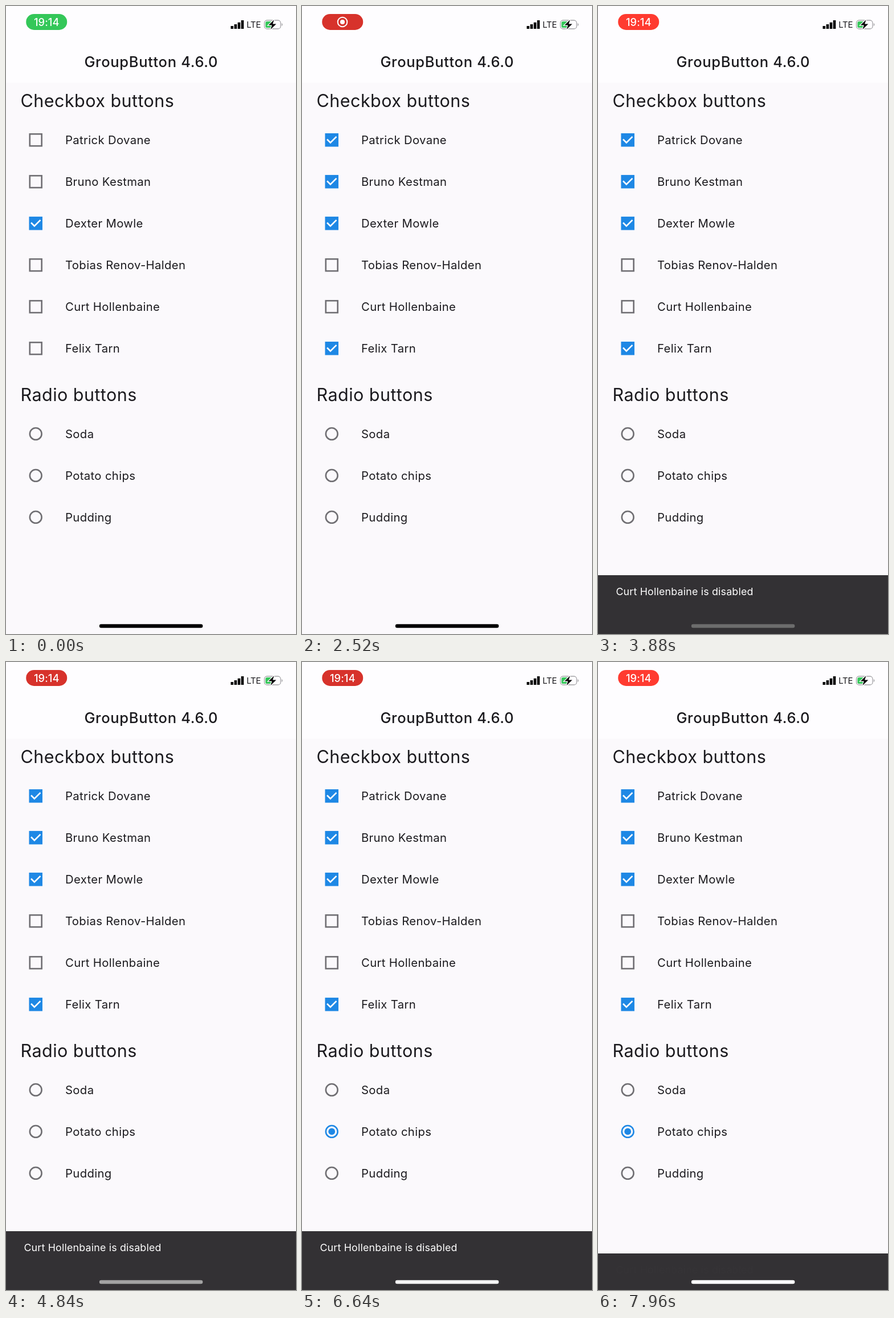
Recreate the animation shown at these times as an HTML page. Size 509 px wide and 1100 px high, loop 8000 ms.

```html
<!DOCTYPE html>
<html lang="en">
<head>
<meta charset="utf-8">
<title>GroupButton</title>
<style>
  html, body { margin: 0; width: 100%; height: 100%; overflow: hidden; background: #fbf9fc; }
  svg { display: block; width: 509px; height: 1100px; }
  text { font-family: Inter, "Open Sans", sans-serif; fill: #1b1a1e; }
  .title { font-size: 25.5px; font-weight: 500; letter-spacing: .68px; text-anchor: middle; }
  .head { font-size: 30.5px; letter-spacing: .45px; }
  .label { font-size: 20.3px; letter-spacing: .35px; }
  .snack { font-size: 17.8px; letter-spacing: .2px; fill: #fff; }
  .clock { font-size: 18.3px; font-weight: 500; letter-spacing: .1px; text-anchor: middle; fill: #fff; }
  .net { font-size: 15px; letter-spacing: -.3px; }
</style>
</head>
<body>
<svg id="stage" viewBox="0 0 509 1100">
  <rect width="509" height="1100" fill="#fbf9fc"/>
  <rect width="509" height="134.3" fill="#fefdff"/>

  <rect id="pill" x="35.2" y="13.9" width="72" height="28" rx="14"/>
  <text id="clock" class="clock" x="71.3" y="34.5">19:14</text>
  <g id="rec" fill="none" stroke="#fff" stroke-width="2">
    <circle cx="71" cy="28" r="8.3"/>
    <circle cx="71" cy="28" r="4" fill="#fff" stroke="none"/>
  </g>

  <path d="M394.5 35h4.6v5h-4.6zM400.6 32h4.6v8h-4.6zM406.7 28.8h4.6v11.2h-4.6zM412.7 25h4.6v15h-4.6z" fill="#000"/>
  <text class="net" x="422.3" y="38.4">LTE</text>
  <rect x="453.5" y="25" width="28.5" height="15" rx="4.6" fill="none" stroke="#a4a3a7" stroke-width="1.3"/>
  <path d="M483.8 30v5.2q1.7-.8 1.7-2.6t-1.7-2.6z" fill="#a4a3a7"/>
  <rect x="455.4" y="27" width="12.6" height="11" rx="2.6" fill="#34c759"/>
  <path d="M470.5 24.2l-9.7 9.3h6l-2.4 7.6 9.9-9.6h-6.2z" fill="#000" stroke="#fefdff" stroke-width="2.4" paint-order="stroke"/>

  <text class="title" x="254.8" y="107">GroupButton 4.6.0</text>
  <text class="head" x="25.6" y="177.3">Checkbox buttons</text>
  <text class="head" x="25.6" y="692.3">Radio buttons</text>
  <g id="rows"></g>

  <g id="snack">
    <rect width="509" height="110" fill="#333134"/>
    <text id="note" class="snack" x="31.4" y="35.3">Curt Hollenbaine is disabled</text>
  </g>
  <rect id="home" x="163.8" y="1082.8" width="181.6" height="6.5" rx="3.25"/>
</svg>
<script>
const LOOP = 8000, SWITCH = 200;
const BLUE = [30, 136, 229], GREY = [112, 111, 115], GREEN = [52, 199, 89];
const BOX = 23.5, LINE = 2.6, ROW = 73, CX = 52.2;

// on / off times in ms; -Infinity means on from the start
const checks = [
  { name: 'Patrick Dovane', on: 800 },
  { name: 'Bruno Kestman', on: 1535 },
  { name: 'Dexter Mowle', on: -Infinity },
  { name: 'Tobias Renov-Halden' },
  { name: 'Curt Hollenbaine' },
  { name: 'Felix Tarn', on: 2260 }
];
const radios = [
  { name: 'Soda', on: 4950, off: 6300 },
  { name: 'Potato chips', on: 6300 },
  { name: 'Pudding' }
];

const $ = id => document.getElementById(id);
const clamp = v => Math.max(0, Math.min(1, v));
const ramp = (t, from, len) => clamp((t - from) / len);
const rgb = c => `rgb(${c.map(Math.round)})`;
const mix = (a, b, k) => a.map((v, i) => v + (b[i] - v) * k);

function set(el, attrs) {
  for (const k in attrs) el.setAttribute(k, attrs[k]);
}

function add(parent, tag, attrs, text) {
  const el = document.createElementNS('http://www.w3.org/2000/svg', tag);
  set(el, attrs);
  if (text) el.textContent = text;
  return parent.appendChild(el);
}

// cubic-bezier(.4, 0, .2, 1)
function fastOutSlowIn(x) {
  let lo = 0, hi = 1, s = .5;
  for (let i = 0; i < 20; i++) {
    s = (lo + hi) / 2;
    const r = 1 - s;
    if (1.2 * r * r * s + .6 * r * s * s + s * s * s < x) lo = s; else hi = s;
  }
  return s * s * (3 - 2 * s);
}

// piecewise linear through [time, value] points
function track(points, t) {
  let [t0, v0] = points[0];
  for (const [t1, v1] of points) {
    if (t < t1) return v0 + (v1 - v0) * clamp((t - t0) / (t1 - t0));
    [t0, v0] = [t1, v1];
  }
  return v0;
}

const rows = $('rows');

checks.forEach((c, i) => {
  c.y = 234.7 + i * ROW;
  add(rows, 'text', { class: 'label', x: 104, y: c.y + 7.5 }, c.name);
  c.box = add(rows, 'rect', { fill: 'none' });
  const at = (u, v) => `${CX + (u - .5) * BOX} ${c.y + (v - .5) * BOX}`;
  c.tick = add(rows, 'path', {
    d: `M${at(.15, .45)}L${at(.4, .7)}L${at(.85, .25)}`,
    pathLength: 1, fill: 'none', stroke: '#fff', 'stroke-width': LINE
  });
});

radios.forEach((r, i) => {
  r.y = 749.4 + i * ROW;
  add(rows, 'text', { class: 'label', x: 104, y: r.y + 7.5 }, r.name);
  r.ring = add(rows, 'circle', { cx: CX, cy: r.y, r: 10.4, fill: 'none', 'stroke-width': LINE });
  r.dot = add(rows, 'circle', { cx: CX, cy: r.y, fill: rgb(BLUE) });
});

// the box dips in size and fills from its edge, then the tick is drawn
function drawCheck(c, t) {
  const p = ramp(t, c.on ?? Infinity, SWITCH);
  const size = BOX - LINE * (1 - Math.abs(p - .5) * 2);
  const edge = Math.min(size / 2, LINE + size * p * p);
  const side = size - edge;
  set(c.box, {
    x: CX - side / 2, y: c.y - side / 2, width: side, height: side,
    stroke: rgb(mix(GREY, BLUE, clamp(p * 7))), 'stroke-width': edge
  });
  const drawn = clamp(p * p * 2 - 1);
  set(c.tick, { 'stroke-dasharray': `${drawn} 2`, opacity: drawn > 0 ? 1 : 0 });
}

function drawRadio(r, t) {
  const p = ramp(t, r.on ?? Infinity, SWITCH) - ramp(t, r.off ?? Infinity, SWITCH);
  set(r.ring, { stroke: rgb(mix(GREY, BLUE, clamp(p * 4))) });
  set(r.dot, { r: 5.9 * p });
}

function drawPill(t) {
  const pulse = ((1 + Math.cos((t - 3900) / 2040 * 2 * Math.PI)) / 2) ** 4;
  const red = mix([215, 50, 43], [255, 59, 48], pulse);
  const start = ramp(t, 300, 300);
  const icon = start - ramp(t, 3120, 240);
  set($('pill'), { fill: rgb(mix(GREEN, red, start)) });
  set($('clock'), { opacity: 1 - icon });
  set($('rec'), { opacity: icon });
}

function drawSnack(t) {
  const first = ramp(t, 3174, 250), leave = ramp(t, 7452, 250), second = ramp(t, 7860, 250);
  const shown = second || first - leave;
  set($('snack'), { transform: `translate(0 ${1100 - 103 * fastOutSlowIn(shown)})`, opacity: shown > 0 ? 1 : 0 });
  set($('note'), { opacity: ramp(second || first, .4, .6) });
  const g = track([[3170, 0], [3240, 85], [3400, 100], [3880, 108], [5720, 214], [7000, 255]], t);
  set($('home'), { fill: rgb([g, g, g]) });
}

function frame(now) {
  const t = now % LOOP;
  checks.forEach(c => drawCheck(c, t));
  radios.forEach(r => drawRadio(r, t));
  drawPill(t);
  drawSnack(t);
  requestAnimationFrame(frame);
}

requestAnimationFrame(frame);
</script>
</body>
</html>
```
